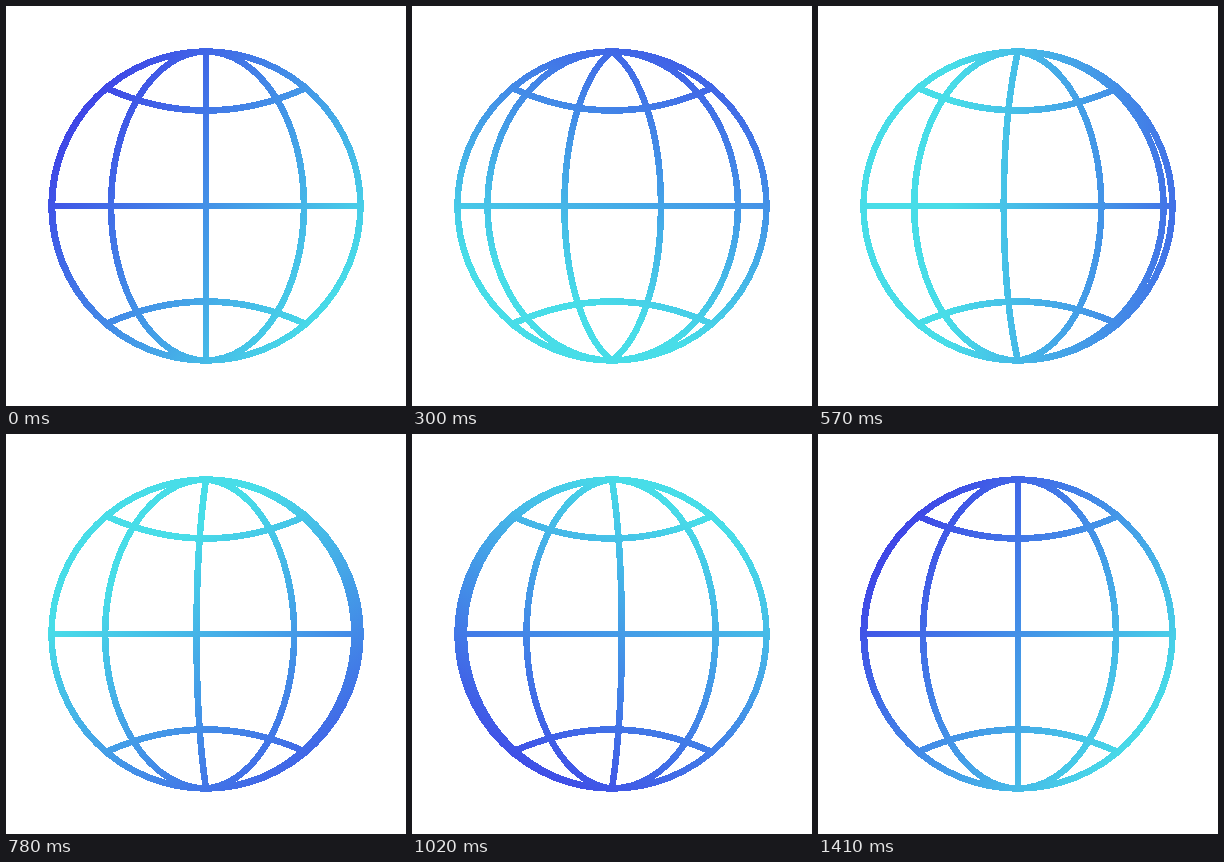
Write an HTML page without scripts that moves like this. It is 400 px wide and 400 px high and loops after 1.44 s.

```html
<!DOCTYPE html>
<html lang="en">
<head>
<meta charset="utf-8">
<title>Spinning globe</title>
<style>
  @property --frame { syntax: "<number>"; inherits: true; initial-value: 0; }

  html, body { margin: 0; width: 100%; height: 100%; overflow: hidden; background: #fff; }
  svg { display: block; width: 100vw; height: 100vh; animation: play 1440ms -2ms steps(48) infinite; }
  @keyframes play { to { --frame: 48; } }

  /* Seven sweeps of 200 ms at 30 ms per frame; the gradient turns once meanwhile */
  svg * {
    --sweeps: calc(min(var(--frame) * .15, 7) + .0001);
    --p: mod(var(--sweeps), 1);
  }
  .paint {
    transform-origin: 250px 200px;
    transform: rotate(calc(35deg + var(--sweeps) * 360deg / 7));
  }

  .lines { fill: none; stroke: #fff; stroke-width: 6.6; shape-rendering: crispEdges; }

  /* Half ellipse through both poles; a shifted centre makes the poles pointed */
  .meridian {
    --x: max(.1, var(--from) * (1 - var(--p)) + var(--to) * var(--p));
    --point: calc(var(--point-from, 0) * (1 - var(--p)) + var(--point-to, 0) * var(--p));
    --shift: calc(var(--point) / (1 - var(--point)));
    --rx: calc(var(--x) / (1 - var(--shift)));
    cx: calc(200px - var(--side) * var(--shift) * var(--rx) * 1px);
    cy: 200px;
    rx: calc(var(--rx) * 1px);
    ry: calc(154.5px / sqrt(1 - var(--shift) * var(--shift)));
  }
  .west { --side: -1; }
  .east { --side: 1; }
  .rise { --from: 154; --to: 95; }
  .morning { --from: 95; --to: 0; --point-to: .45; }
  .evening { --from: 0; --to: 98; --point-from: .45; }
  .set { --from: 98; --to: 154; }
</style>
</head>
<body>
<svg viewBox="0 0 400 400">
  <defs>
    <linearGradient id="sky" gradientUnits="userSpaceOnUse" x1="31" y1="200" x2="370" y2="200">
      <stop offset="0" stop-color="#3e3ce6"/>
      <stop offset="1" stop-color="#48dde8"/>
    </linearGradient>
    <clipPath id="west"><rect x="42" y="42" width="161" height="316"/></clipPath>
    <clipPath id="east"><rect x="197" y="42" width="161" height="316"/></clipPath>
    <mask id="globe" maskUnits="userSpaceOnUse" x="0" y="0" width="400" height="400">
      <g class="lines">
        <circle cx="200" cy="200" r="154.5"/>
        <path d="M43 200H357"/>
        <path d="M100 82Q200 127 300 82"/>
        <path d="M100 318Q200 273 300 318"/>
        <g class="west" clip-path="url(#west)">
          <ellipse class="meridian rise"/>
          <ellipse class="meridian morning"/>
        </g>
        <g class="east" clip-path="url(#east)">
          <ellipse class="meridian evening"/>
          <ellipse class="meridian set"/>
        </g>
      </g>
    </mask>
  </defs>
  <g mask="url(#globe)">
    <rect class="paint" x="-250" y="-300" width="1000" height="1000" fill="url(#sky)"/>
  </g>
</svg>
</body>
</html>
```
